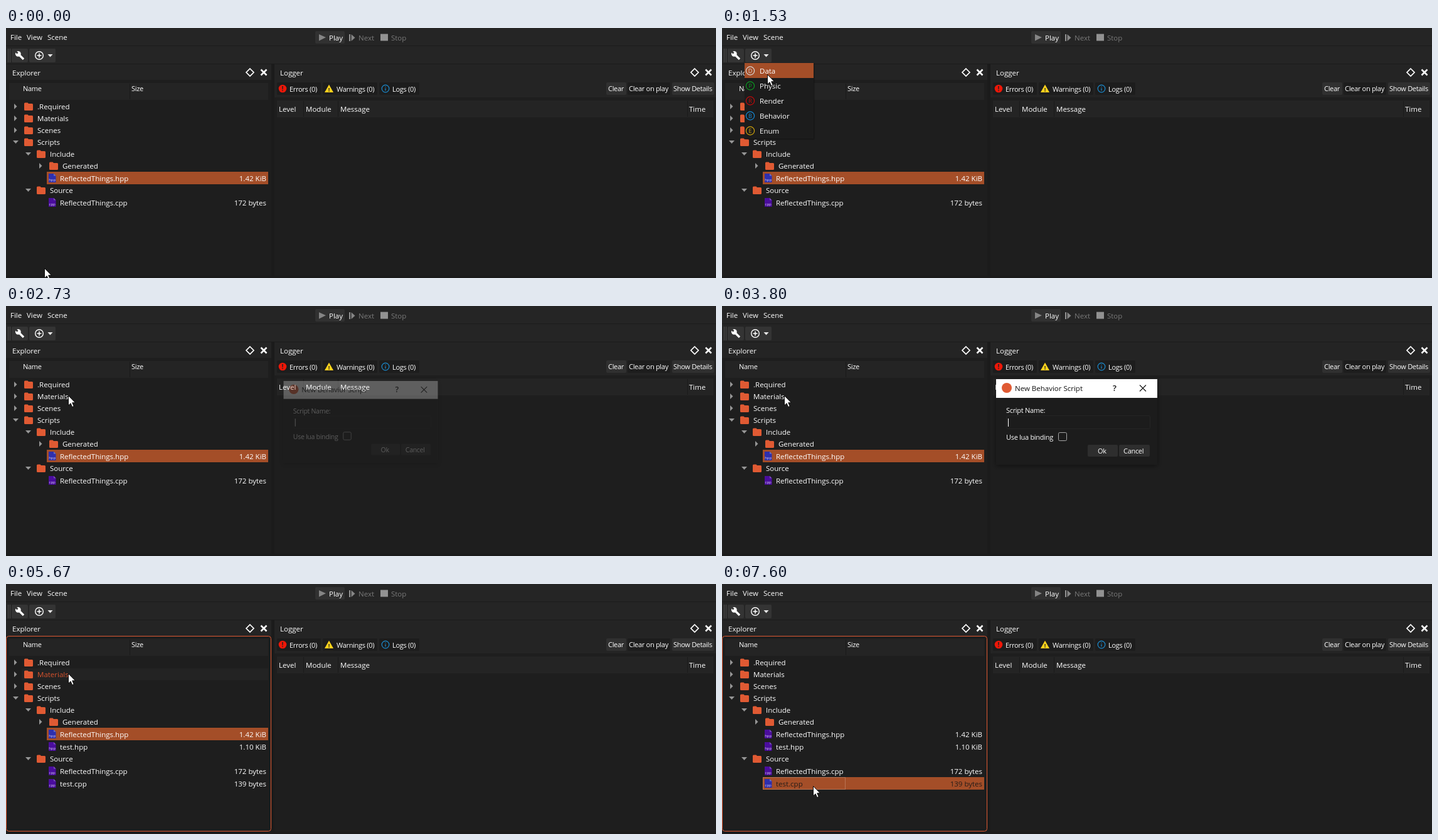
An HTML page that plays this animation: 1132 px wide and 400 px high, repeating every 8000 ms.

```html
<!DOCTYPE html>
<html lang="en">
<head>
<meta charset="utf-8">
<title>Script creation</title>
<style>
html, body { margin: 0; width: 100%; height: 100%; overflow: hidden; background: #1b1b1b; }
svg { display: block; }
text { font: 11.5px "Open Sans", "Noto Sans", sans-serif; fill: #fff; white-space: pre; }
text.s { font-size: 11px; letter-spacing: -.3px; }
text.glyph { font-size: 9px; text-anchor: middle; }
text.ext { font-size: 6px; text-anchor: middle; fill: #d5c8f0; }
text.mark { font-size: 10px; font-weight: 700; text-anchor: middle; }
</style>
</head>
<body>
<svg width="1132" height="400" viewBox="0 0 1132 400">
  <g id="base"></g><g id="live"></g>
</svg>
<script>
const LOOP = 8000, TICK = 1000 / 15;
const ORANGE = '#e05a33', SELECT = '#a44e28';

const rect = (x, y, w, h, fill, extra = '') =>
  `<rect x="${x}" y="${y}" width="${w}" height="${h}" fill="${fill}" ${extra}/>`;
const path = (d, fill, extra = '') => `<path d="${d}" fill="${fill}" ${extra}/>`;
const line = (d, color, width = 1) => path(d, 'none', `stroke="${color}" stroke-width="${width}"`);
const circle = (x, y, r, fill, extra = '') => `<circle cx="${x}" cy="${y}" r="${r}" fill="${fill}" ${extra}/>`;
const text = (x, y, s, extra = '') => `<text x="${x}" y="${y}" ${extra}>${s}</text>`;
const small = (x, y, s, color = '#fff') => text(x, y, s, `class="s" style="fill:${color}"`);
const ink = color => `style="fill:${color}"`;

function dockTitle(x, w, label, textX, iconX) {
  return rect(x, 58, w, 25, '#242424') + text(textX, 76, label) +
    line(`M${iconX} 65l6 6-6 6-6-6z`, '#fff', 1.7) +
    line(`M${iconX + 17.5} 66.5l9 9m0-9l-9 9`, '#fff', 2.6);
}

function drawBase() {
  return rect(0, 0, 1132, 57, '#252525') + rect(0, 28, 1132, 1, '#1c1c1c') +
    text(7, 19, 'File') + text(33, 19, 'View') + text(66, 19, 'Scene') +
    rect(493, 5, 47, 20, '#313131', 'rx="2"') +
    path('M499 10l11 5-11 5.5z', '#858585') + text(515, 20, 'Play') +
    rect(547, 10, 2, 11, '#929292') + path('M550.5 10l6 5.5-6 5.5z', '#858585') + text(562, 20, 'Next', ink('#797979')) +
    rect(597, 9.5, 12, 11, '#929292') + text(614, 20, 'Stop', ink('#797979')) +
    line('M3.5 33v22M6.5 33v22', '#454545', 1.5) +
    rect(9, 33, 26, 22, '#343434', 'rx="2"') +
    circle(19.3, 41.3, 4.4, '#fff') + line('M20 42l8 8', '#fff', 3.4) + line('M14 36l4.5 4.5', '#343434', 2.8) +
    dockTitle(0, 423, 'Explorer', 10, 389) + dockTitle(428, 704, 'Logger', 437, 1098) +
    rect(0, 83, 423, 313, '#1e1e1e') + rect(428, 83, 704, 313, '#1e1e1e') +
    rect(5, 88, 413, 27, '#242424') + rect(197, 89, 1, 25, '#1a1a1a') +
    small(27, 101, 'Name') + small(200, 101, 'Size') +
    rect(428, 83, 704, 28, '#242424') +
    [[432, 70], [505, 87], [595, 64]].map(([x, w]) => rect(x, 87, w, 20, '#1d1d1d', 'rx="2"')).join('') +
    circle(441, 97, 6.3, '#ee1708') + text(441, 100.7, '!', 'class="mark" style="fill:#222"') +
    path('M515 90.5l7 12.5h-14z', '#ffd21c') + text(515, 102, '!', 'class="mark" style="fill:#222;font-size:9px"') +
    circle(605, 97, 5.8, 'none', 'stroke="#1b8cd0" stroke-width="1.2"') + line('M605 93.5v1.3m0 1.5v4', '#1b8cd0', 1.2) +
    small(452, 102, 'Errors (0)') + small(527, 102, 'Warnings (0)') + small(616, 102, 'Logs (0)') +
    rect(957, 87, 32, 20, '#303030', 'rx="2"') + rect(991, 87, 68, 20, '#1d1d1d', 'rx="2"') + rect(1062, 87, 67, 20, '#303030', 'rx="2"') +
    small(960, 101, 'Clear') + small(993, 101, 'Clear on play') + small(1064, 101, 'Show Details') +
    rect(432, 116, 696, 27, '#242424') +
    [474, 529, 1086].map(x => rect(x, 117, 1, 25, '#1a1a1a')).join('') +
    text(435, 134, 'Level') + text(478, 134, 'Module') + text(533, 134, 'Message') + text(1089, 134, 'Time');
}

// Tree rows: name, indent, then open state for folders or size for files.
const HEAD = [['.Required', 0, false], ['Materials', 0, false], ['Scenes', 0, false], ['Scripts', 0, true],
  ['Include', 1, true], ['Generated', 2, false], ['ReflectedThings.hpp', 2, '1.42 KiB']];
const TAIL = [['Source', 1, true], ['ReflectedThings.cpp', 2, '172 bytes']];
const BEFORE = [...HEAD, ...TAIL];
const AFTER = [...HEAD, ['test.hpp', 2, '1.10 KiB'], ...TAIL, ['test.cpp', 2, '139 bytes']];

function treeRow([name, depth, info], top, selected, hover, focus) {
  const isFile = typeof info === 'string', h = isFile ? 20 : 19;
  const x = 29 + depth * 20, mid = top + Math.floor(h / 2), base = mid + 5;
  const left = isFile ? 65 : x - 4;
  const color = selected ? (hover ? '#241c19' : '#fff') : hover ? '#d9532d' : '#fff';
  let out = '';
  if (selected) out += rect(left, top, 418 - left, h, SELECT);
  else if (hover) out += rect(left, top, 418 - left, h, '#232323');
  if (isFile) {
    out += path(`M68 ${top + 3}h8l3.5 3.5v10.5h-11.5z`, selected ? '#2e2fae' : '#4a0d9d') +
      path(`M76 ${top + 3}v3.5h3.5z`, selected ? '#6a72cc' : '#7d50c0') +
      text(73.7, top + 15, name.slice(-3), 'class="ext"') +
      text(86, base, name, ink(color)) +
      text(415, base, info, `text-anchor="end" style="fill:${color}"`);
    if (focus) out += rect(65.5, top + .5, 131, h - 1, 'none', `stroke="${focus}" stroke-dasharray="1 1"`);
  } else {
    out += path(info ? `M${x - 18} ${mid - 2}h9l-4.5 5z` : `M${x - 16} ${mid - 4}l4.5 4.5-4.5 4.5z`, '#969696') +
      path(`M${x} ${mid - 4}q0-1.5 1.5-1.5h4l1.5 1.5h5.5q1.5 0 1.5 1.5v8q0 1.5-1.5 1.5h-11q-1.5 0-1.5-1.5z`, ORANGE) +
      text(x + 21, base, name, ink(color));
  }
  return out;
}

function drawTree(k, cursor) {
  const active = (k >= 1 && k < 12 || k >= 85) && cursor.y >= 83;
  const chosen = k < 102 ? 'ReflectedThings.hpp' : k < 114 ? 'test.hpp' : 'test.cpp';
  const focus = k < 102 ? '' : k < 114 ? '#62b2df' : '#d09a80';
  let top = 116, out = '';
  for (const row of k < 85 ? BEFORE : AFTER) {
    const h = typeof row[2] === 'string' ? 20 : 19;
    const hover = active && cursor.y >= top && cursor.y < top + h;
    const selected = row[0] === chosen;
    out += treeRow(row, top, selected, hover, selected && focus);
    top += h;
  }
  if (active) out += rect(.5, 83.5, 422, 312, 'none', `rx="4" stroke="${ORANGE}"`);
  return out;
}

const MENU = [['Data', '#d8d8d8'], ['Physic', '#0b9d22'], ['Render', '#c40a0a'], ['Behavior', '#168bd8'], ['Enum', '#d2a60c']];

function drawMenu(cursor) {
  return rect(36, 56, 110, 121, '#1b1b1b', 'filter="url(#menuShade)"') + MENU.map(([name, color], i) => {
    const y = 56 + i * 24, hover = cursor.y >= y && cursor.y < y + 24;
    return (hover ? rect(36, y, 110, 24, SELECT) : '') +
      circle(45, y + 12.5, 6.6, 'none', `stroke="${color}" stroke-width="1.2"`) +
      text(45, y + 16, name[0], `class="glyph" style="fill:${color}"`) + text(60, y + 17, name);
  }).join('');
}

function drawDialog(k) {
  const opening = [[.27, .957], [.62, .98], [.86, .993], [.96, .998]], closing = [[.72, .987], [.38, .97], [.13, .957]];
  const [alpha, scale] = opening[k - 41] || closing[k - 73] || [1, 1];
  const typed = [59, 61, 62, 64].filter(start => k >= start).length;
  const caretX = [456, 460, 466, 471, 475][typed];
  const button = (x, w, label, labelX) => rect(x, 222, w, 19, '#2e2e2e', 'rx="2"') + small(labelX, 236, label);
  return `<g opacity="${alpha}" transform="translate(565.5 185.5) scale(${scale}) translate(-565.5 -185.5)">` +
    rect(437, 117, 257, 137, '#1e1e1e', 'filter="url(#shade)"') + rect(437, 117, 257, 30, '#fff') +
    circle(454, 131, 8, ORANGE) + text(467, 136, 'New Behavior Script', ink('#111')) +
    text(623, 136, '?', 'style="fill:#111;font-size:13px;font-weight:600"') + line('M666 126.5l10 10m0-10l-10 10', '#111', 1.1) +
    small(453, 171, 'Script Name:') + rect(453.5, 175.5, 229, 21, '#1c1c1c', 'rx="2" stroke="#252525"') +
    small(456, 190, 'test'.slice(0, typed)) +
    (k >= 49 && k < 57 ? '' : rect(caretX, 180, 1, 13, '#fff')) +
    small(453, 214, 'Use lua binding') + rect(536.5, 202.5, 13, 13, 'none', 'rx="2" stroke="#a8a8a8"') +
    button(583, 48, 'Ok', 599) + button(633, 49, 'Cancel', 640) + '</g>';
}

// Cursor waypoints: tick, x, y.
const ROUTE = [[0, 61, 384], [11, 69, 43], [17, 69, 43], [23, 72, 74], [28, 99, 134], [29, 99, 142],
  [30, 99, 142], [31, 99, 143], [85, 99, 143], [94, 164, 256], [106, 164, 256], [109, 145, 323], [120, 145, 323]];

function cursorAt(k) {
  const i = ROUTE.findIndex(point => point[0] > k);
  const [k0, x0, y0] = ROUTE[i - 1], [k1, x1, y1] = ROUTE[i];
  const p = (k - k0) / (k1 - k0), e = p * p * (3 - 2 * p);
  return { x: Math.round(x0 + (x1 - x0) * e), y: Math.round(y0 + (y1 - y0) * e) };
}

function drawLive(k) {
  const cursor = cursorAt(k);
  const onButton = cursor.y < 56 && cursor.x > 36;
  const menuOpen = k >= 16 && k < 41, dialogOpen = k >= 41 && k < 76;
  return rect(37, 33, 42, 22, onButton ? '#3b3b3b' : '#343434', 'rx="2"') +
    circle(53, 44, 6.3, 'none', 'stroke="#fff" stroke-width="1.4"') + line('M53 40.5v7m-3.5-3.5h7', '#fff', 1.5) +
    path('M66.5 42h8l-4 4.5z', '#e8e8e8') +
    drawTree(k, cursor) + (menuOpen ? drawMenu(cursor) : '') + (dialogOpen ? drawDialog(k) : '') +
    path('M.5.5V16l3.6-3.3 2.5 5.8 2.6-1.1-2.5-5.7h4.7z', '#fff',
      `stroke="#000" stroke-width=".9" transform="translate(${cursor.x} ${cursor.y})"`);
}

const shade = (id, dx, dy, blur) =>
  `<filter id="${id}"><feDropShadow dx="${dx}" dy="${dy}" stdDeviation="${blur}" flood-color="#000" flood-opacity=".45"/></filter>`;
document.getElementById('base').innerHTML =
  `<defs>${shade('shade', 0, 2, 4)}${shade('menuShade', 1, 1, 1.2)}</defs>` + drawBase();

const live = document.getElementById('live');
const start = performance.now();
let shown = -1;

function render() {
  const t = (performance.now() - start) % LOOP;
  const k = Math.min(119, Math.floor((t + 5) / TICK));
  if (k !== shown) live.innerHTML = drawLive(shown = k);
  requestAnimationFrame(render);
}
render();
</script>
</body>
</html>
```
